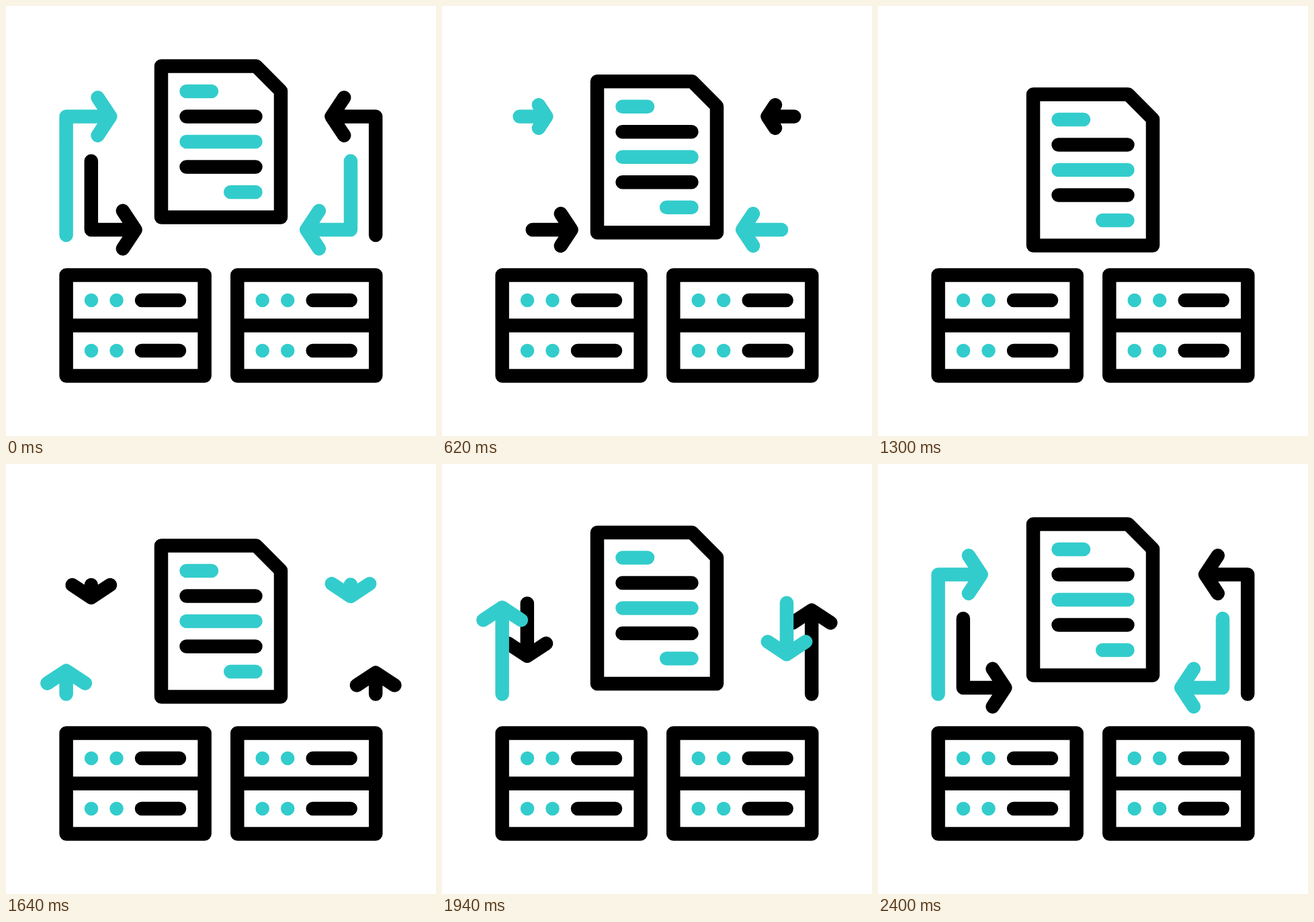
Recreate the animation shown at these times as an HTML page. Size 640x640 px, loop 2420 ms.

```html
<!DOCTYPE html>
<html lang="en">
<head>
<meta charset="utf-8">
<title>File sync</title>
<style>
  html, body { margin: 0; width: 100%; height: 100%; overflow: hidden; background: #fff; }
  svg { display: block; width: 100%; height: 100%; }
  .line { fill: none; stroke: #000; stroke-width: 20.5; stroke-linecap: round; stroke-linejoin: round; }
  .teal { stroke: #3cc; }
</style>
</head>
<body>
<svg viewBox="0 0 640 640">
  <defs>
    <g id="unit">
      <path class="line" d="M89.6 400.5H295.6V550.5H89.6ZM89.6 475.5H295.6M202 438H258M202 513H258"/>
      <path class="line teal" d="M127 438h.01M164.5 438h.01M127 513h.01M164.5 513h.01"/>
    </g>
  </defs>
  <use href="#unit"/>
  <use href="#unit" x="254.7"/>
  <g id="doc">
    <path class="line" d="M231 89.5H372.2L409 126.5V314.5H231ZM268.5 164.5H371.5M268.5 239.5H371.5"/>
    <path class="line teal" d="M268.5 127H306M268.5 202H371.5M334.2 277H371.5"/>
  </g>
  <g id="arrows"></g>
</svg>
<script>
const LOOP = 2420, PEAK = 1200, LIFT = 42.3;
const WING_BACK = 18.6, WING_SIDE = 28.2;

// An arrow runs `bend` px vertically, then sideways, `reach` px in all.
// `lead` is how far above its place it starts to grow; spans are in ms.
const outer = {
  y: 342.5, dy: -1, bend: 178, reach: 243.6, lead: 0,
  erase: [-40, 848], shrink: [452, 850], grow: [1388, 2453], settle: [1335, 2345]
};
const inner = {
  y: 230, dy: 1, bend: 103, reach: 168.7, lead: 64,
  erase: [-40, 1050], shrink: [483, 1040], grow: [1383, 2478], settle: [1335, 2345]
};
const arrows = [
  { ...inner, x: 126.8, side: 1, color: '', late: 0 },
  { ...outer, x: 550.2, side: -1, color: '', late: 12 },
  { ...outer, x: 89.6, side: 1, color: 'teal', late: 0 },
  { ...inner, x: 513, side: -1, color: 'teal', late: 8 }
];

const doc = document.getElementById('doc');
const layer = document.getElementById('arrows');
for (const a of arrows) {
  a.el = document.createElementNS('http://www.w3.org/2000/svg', 'path');
  a.el.setAttribute('class', 'line ' + a.color);
  layer.append(a.el);
}

const mix = (a, b, p) => a + (b - a) * p;
const smooth = u => u * u * (3 - 2 * u);
const during = ([from, to], t) => smooth(Math.min(1, Math.max(0, (t - from) / (to - from))));

// cubic-bezier(.5, 0, .5, 1)
function ease(u) {
  let s = u;
  for (let i = 0; i < 6; i++)
    s -= (1.5 * s - 1.5 * s * s + s ** 3 - u) / (1.5 - 3 * s + 3 * s * s);
  return smooth(s);
}

function pointAt(a, s) {
  return [a.x + a.side * Math.max(0, s - a.bend), a.y + a.dy * Math.min(s, a.bend)];
}

function arrowPath(a, from, to, size) {
  const [x, y] = pointAt(a, to);
  const turned = to > a.bend;
  const dx = turned ? a.side : 0, dy = turned ? 0 : a.dy;
  const wing = k => [
    x + size * (-dx * WING_BACK - dy * WING_SIDE * k),
    y + size * (-dy * WING_BACK + dx * WING_SIDE * k)
  ];
  const shaft = [pointAt(a, from)];
  if (from < a.bend && turned) shaft.push(pointAt(a, a.bend));
  shaft.push([x, y + 0.01]);
  return 'M' + shaft.join('L') + 'M' + [wing(1), [x, y], wing(-1)].join('L');
}

function arrowAt(a, t) {
  if (t < a.shrink[1])
    return arrowPath(a, a.reach * during(a.erase, t), a.reach, 1 - during(a.shrink, t));
  const local = t - a.late;
  if (local <= a.grow[0]) return '';
  const tail = mix(-a.lead, 0, during(a.settle, local));
  const tip = mix(-a.lead, a.reach, during(a.grow, local));
  return arrowPath(a, Math.min(tail, tip), tip, 1);
}

function draw(t) {
  const rise = t < PEAK ? ease(t / PEAK) : 1 - ease((t - PEAK) / (LOOP - PEAK));
  doc.setAttribute('transform', `translate(0 ${LIFT * rise})`);
  for (const a of arrows) a.el.setAttribute('d', arrowAt(a, t));
}

const start = performance.now();
function tick() {
  draw((performance.now() - start) % LOOP);
  requestAnimationFrame(tick);
}
tick();
</script>
</body>
</html>
```
